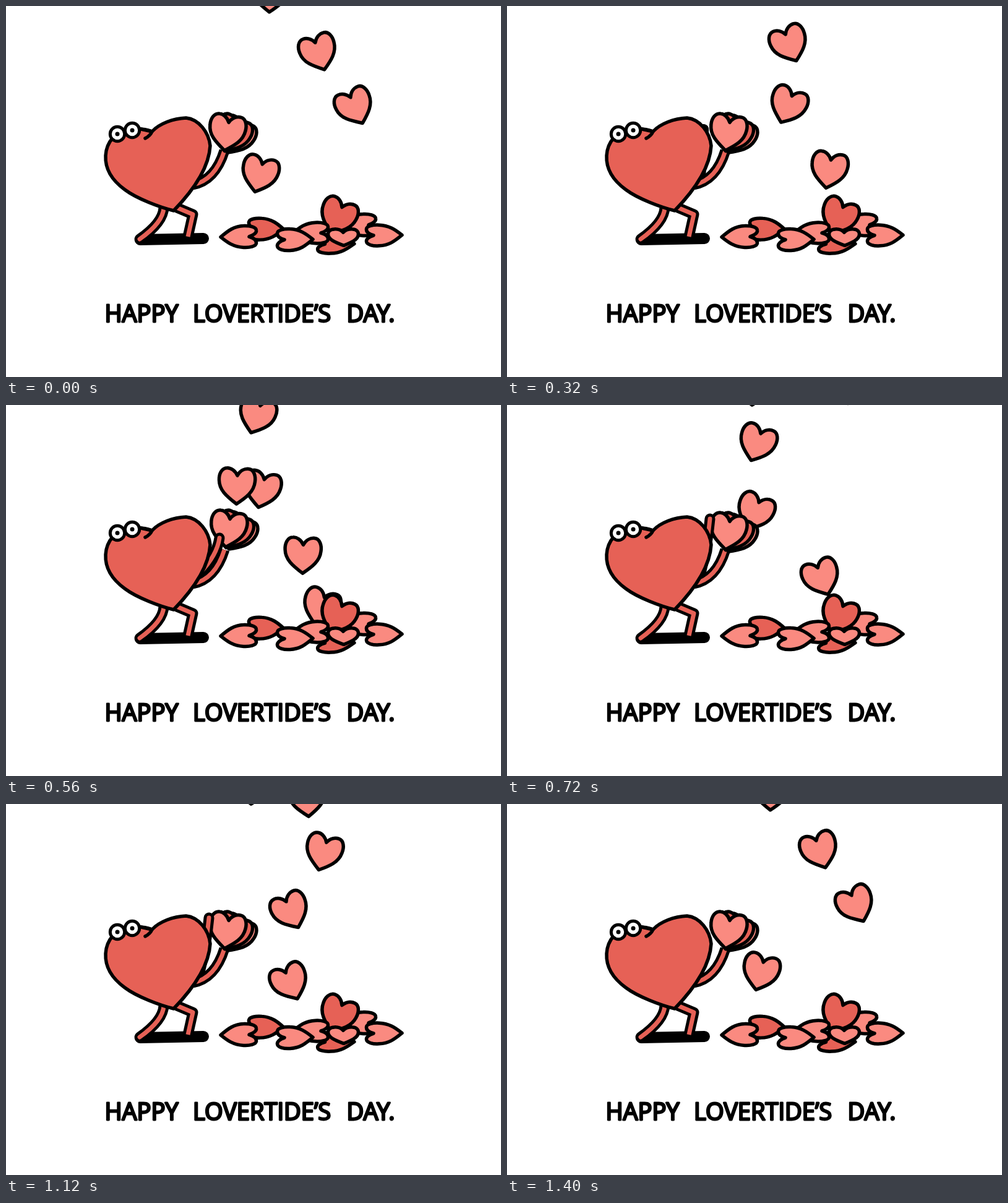
Write an HTML page with a canvas that moves like this. It is 800 px wide and 600 px high and loops after 1440 ms.

```html
<!DOCTYPE html>
<html lang="en">
<head>
<meta charset="utf-8">
<title>Tossing hearts</title>
<style>
html, body { margin: 0; width: 100%; height: 100%; overflow: hidden; background: #fff; }
canvas { display: block; }
</style>
</head>
<body>
<canvas id="stage" width="800" height="600"></canvas>
<script>
const ctx = document.getElementById('stage').getContext('2d');
const RED = '#e66156', PINK = '#fa8a80', INK = '#000';
const CYCLE = 36, FRAME_MS = 40;

const heartShape = new Path2D('M0-17C-4-25-11-29-17-28.5C-26-28-30-18-29-8C-28 8-16 17 1 29' +
  'C16 18 28 8 29-8C30-18 26-28 18-28.5C11-29 4-25 0-17Z');
const body = new Path2D('M236 203C248 190 270 182 291 181C312 183 328 205 330 226C328 262 302 299 271 331' +
  'C250 326 212 312 192 297C170 281 160 263 161 242C162 222 176 200 204 199Q224 198 236 203Z');
const crease = new Path2D('M218 199L236 203Q233 210 225 214');
const shadow = new Path2D('M217 378L319 376');
const leftLeg = new Path2D('M255 326Q254 350 216 377');
const rightLeg = new Path2D('M276 326L302 337L294 373');
const restingArm = new Path2D('M302 289Q338 282 353 234');

// x, y, turn, fill, x scale, y scale; back to front
const pile = [
  [569, 354, 90, PINK, 1, .6],
  [536, 341, 24, RED, 1, 1],
  [533, 385, -90, RED, 1.03, .52],
  [492, 367, 90, PINK, 1, .58],
  [545, 374, 0, PINK, .84, .46],
  [611, 371, -90, PINK, 1, .58],
  [420, 361, -87, RED, 1, .6],
  [376, 373, 90, PINK, 1, .6],
  [467, 378, -90, PINK, 1, .6]
];
const held = [[371, 211, 28, PINK], [365, 208, 25, RED], [357, 205, 10, PINK]];

// swing centre, step at which it enters, swing phase on entry
const falls = [[430, 2.36, -1.05], [483, -6.55, -1.05], [534, -14.76, -4.21], [430, 12.35, -4.18]];
const throws = [3.55, 14, 24, 31.2];

// throwing hand: step after release, x, y
const handKeys = [[-2.5, 318, 262], [0, 345, 215], [1.5, 346, 178], [4, 328, 184], [4.7, 312, 208]];

const wrap = (n, start) => ((n - start) % CYCLE + CYCLE) % CYCLE + start;

function line(path, color, width) {
  ctx.strokeStyle = color;
  ctx.lineWidth = width;
  ctx.stroke(path);
}

function shape(path, fill, width = 5.5) {
  ctx.fillStyle = fill;
  ctx.fill(path);
  line(path, INK, width);
}

function heart(x, y, turn, fill, sx = 1, sy = 1) {
  const path = new Path2D();
  path.addPath(heartShape, new DOMMatrix().translate(x, y).scale(sx, sy).rotate(turn));
  shape(path, fill);
}

function limb(path, cap = 'butt') {
  ctx.lineCap = cap;
  line(path, INK, 17);
  line(path, RED, 7);
  ctx.lineCap = 'round';
}

function circle(x, y, r) {
  const path = new Path2D();
  path.arc(x, y, r, 0, 7);
  return path;
}

function fallingHeart(k, [center, entry, phase]) {
  const n = wrap(k - entry, -6);
  const swing = phase + .275 * n;
  const y = 11.45 * n - 7 * Math.cos(2 * swing) + 1;
  if (y < 366) heart(center + 30 * Math.cos(swing), y, -24 * Math.cos(swing), PINK);
}

function throwingArm(t) {
  const i = handKeys.findIndex(key => key[0] > t);
  if (i < 1) return;
  const [t0, x0, y0] = handKeys[i - 1], [t1, x1, y1] = handKeys[i];
  const f = (t - t0) / (t1 - t0);
  const x = x0 + (x1 - x0) * f, y = y0 + (y1 - y0) * f;
  limb(new Path2D(`M313 272Q${x - 4} ${(y + 272) / 2} ${x} ${y}`), 'round');
}

function character(k) {
  line(shadow, INK, 18);
  limb(leftLeg, 'round');
  limb(rightLeg);
  limb(restingArm);

  const times = throws.map(release => wrap(k - release, -3));
  const push = Math.max(0, ...times.map(t => 1 - Math.abs(t) / 1.5));
  for (const [x, y, turn, fill] of held) heart(x + 2 * push, y - 4 * push, turn, fill);
  for (const t of times) {
    if (t > -1.5 && t < 6) heart(373 + 9.5 * t - .9 * t * t, 131 - 40 * t, 3, PINK);
    throwingArm(t);
  }

  shape(body, RED);
  ctx.stroke(crease);
  for (const [x, y] of [[180, 207], [204, 201]]) {
    shape(circle(x, y, 11.7), '#fff', 5);
    ctx.fillStyle = INK;
    ctx.fill(circle(x, y, 3.5));
  }
}

function caption() {
  // a light face thickened with a round pen
  ctx.font = '400 38px "Open Sans", sans-serif';
  ctx.fillStyle = ctx.strokeStyle = INK;
  ctx.lineWidth = 2.8;
  for (const [word, x] of [['HAPPY', 159.5], ['LOVERTIDE’S', 302], ['DAY.', 550.5]]) {
    ctx.fillText(word, x, 510.5);
    ctx.strokeText(word, x, 510.5);
  }
}

function draw(now) {
  // the last step of the loop holds the opening pose
  const k = Math.floor(now / FRAME_MS) % CYCLE % (CYCLE - 1);
  ctx.fillStyle = '#fff';
  ctx.fillRect(0, 0, 800, 600);
  ctx.lineJoin = ctx.lineCap = 'round';
  for (const fall of falls) fallingHeart(k, fall);
  for (const item of pile) heart(...item);
  character(k);
  caption();
  requestAnimationFrame(draw);
}
requestAnimationFrame(draw);
</script>
</body>
</html>
```
